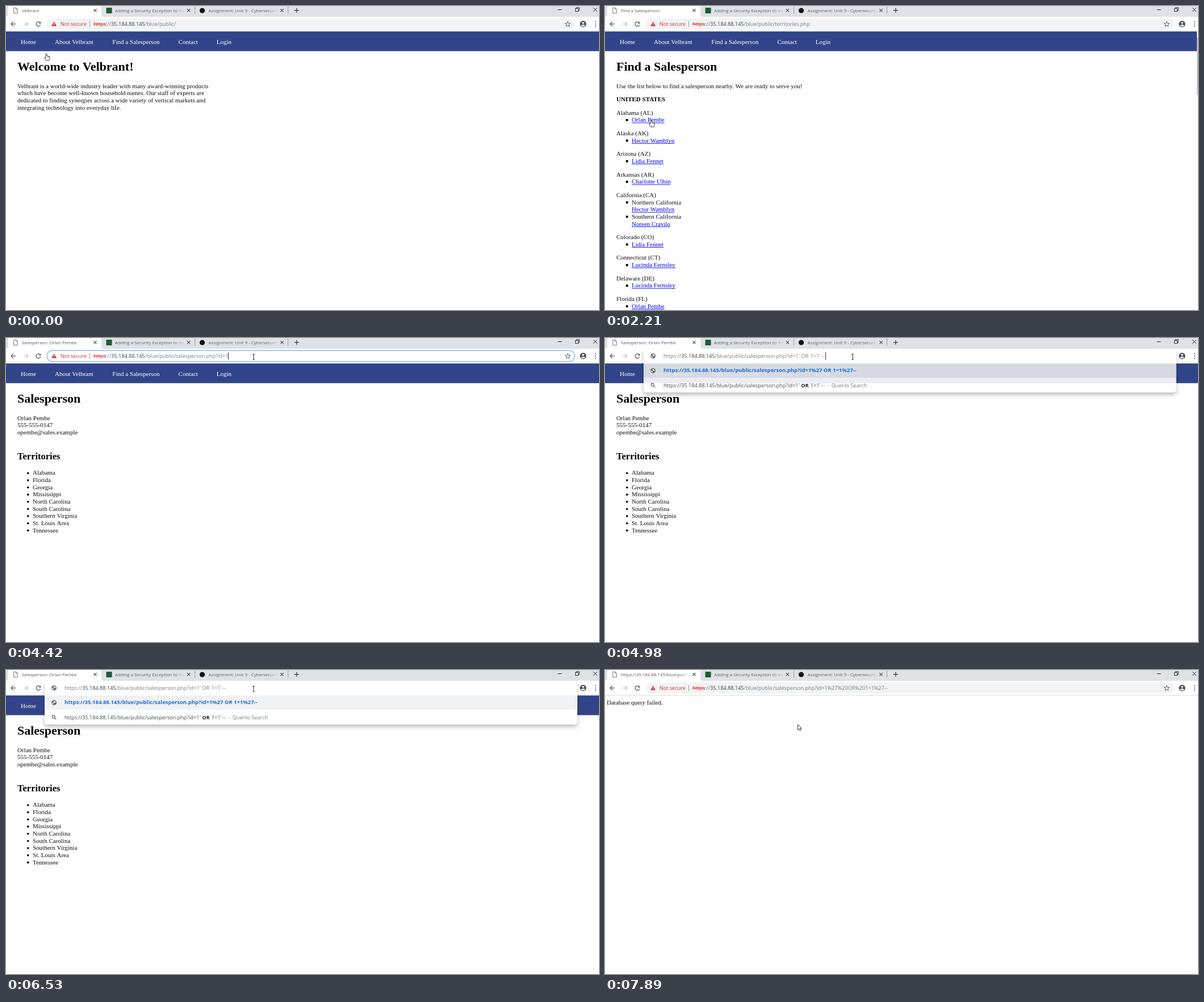
These frames come from a looping animation (1044 px wide and 536 px high, 8 s). An HTML page with a canvas:

```html
<!DOCTYPE html>
<html lang="en">
<head>
<meta charset="utf-8">
<title>Browser session</title>
<style>
  html, body { margin: 0; width: 100%; height: 100%; overflow: hidden; background: #fefefe; }
  canvas { display: block; }
</style>
</head>
<body>
<canvas id="stage" width="1044" height="536"></canvas>
<script>
const ctx = document.getElementById("stage").getContext("2d");
const LOOP = 8000, W = 1044, H = 536;
const UI = '"Open Sans", "Noto Sans", sans-serif';
const SERIF = '"Liberation Serif", "Times New Roman", serif';
const LINE = 12.65;
const INK = "#111", GREY = "#777b80", DARK = "#3c4043", RED = "#d93025", BLUE = "#1a6fe0";

const COMPANY = "Velbrant", SELLER = "Orlan Pembe";
const HOST = "35.184.88.145", BASE = "/blue/public/";
const PERSON = BASE + "salesperson.php?id=1";

// Pointer holds each place until the next time: [ms, x, y, kind]
const POINTER = [
  [0, 71, 83.5, "hand"], [280, 162, 75.5, "arrow"], [430, 205, 70, "hand"],
  [560, 244, 66, "hand"], [710, 270, 60, "hand"], [830, 294, 58, "arrow"],
  [950, 234, 56, "hand"], [1410, 243, 110, "arrow"], [1560, 170, 130, "arrow"],
  [1680, 114, 151, "arrow"], [1830, 100, 170, "arrow"], [1950, 88, 190, "arrow"],
  [2070, 81, 200, "arrow"], [2210, 81, 200.5, "hand"], [2740, 336, 156, "arrow"],
  [2890, 390, 110, "arrow"], [3010, 424, 70, "arrow"], [3130, 440, 45, "arrow"],
  [3250, 436, 33, "beam"], [7890, 339.5, 96.2, "arrow"]
];

const STATES = [
  ["Alabama (AL)", [SELLER]],
  ["Alaska (AK)", ["Hector Wamblyn"]],
  ["Arizona (AZ)", ["Lidia Fennet"]],
  ["Arkansas (AR)", ["Charlotte Ulbin"]],
  ["California (CA)", ["Hector Wamblyn", "Noreen Cravilo"], ["Northern California", "Southern California"]],
  ["Colorado (CO)", ["Lidia Fennet"]],
  ["Connecticut (CT)", ["Lucinda Fernsley"]],
  ["Delaware (DE)", ["Lucinda Fernsley"]],
  ["Florida (FL)", [SELLER]]
];
const AREAS = ["Alabama", "Florida", "Georgia", "Mississippi", "North Carolina", "South Carolina",
  "Southern Virginia", "St. Louis Area", "Tennessee"];

const within = (t, a, b) => t >= a && t < b;

function rect(x, y, w, h, color) {
  ctx.fillStyle = color;
  ctx.fillRect(x, y, w, h);
}

function shape(draw, fill, stroke, width = 1) {
  ctx.beginPath();
  draw();
  if (fill) { ctx.fillStyle = fill; ctx.fill(); }
  if (stroke) { ctx.strokeStyle = stroke; ctx.lineWidth = width; ctx.stroke(); }
}

const disc = (x, y, r, fill, stroke, width) =>
  shape(() => ctx.arc(x, y, r, 0, Math.PI * 2), fill, stroke, width);

function poly(points, fill, stroke, width, open) {
  shape(() => {
    points.forEach(([x, y]) => ctx.lineTo(x, y));
    if (!open) ctx.closePath();
  }, fill, stroke, width);
}

const line = (x1, y1, x2, y2, color, width = 1) =>
  poly([[x1, y1], [x2, y2]], null, color, width, true);

function cross(x, y, r, color, width) {
  line(x - r, y - r, x + r, y + r, color, width);
  line(x - r, y + r, x + r, y - r, color, width);
}

// Draws text and returns its right end
function write(text, x, y, size, color, family, weight = "400") {
  ctx.font = `${weight} ${size}px ${family}`;
  ctx.fillStyle = color;
  ctx.fillText(text, x, y);
  return x + ctx.measureText(text).width;
}

const ui = (text, x, y, color = GREY) => write(text, x, y, 9.13, color, UI);
const body = (text, x, y, color = INK) => write(text, x, y, 11, color, SERIF);
const head = (text, x, y, size) => write(text, x, y, size, "#000", SERIF, "700");

function link(text, x, y) {
  const end = body(text, x, y, "#0000ee");
  rect(x, y + 1.2, end - x, 0.9, "#0000ee");
}

function tabTitle(text, x, end, color) {
  const fade = ctx.createLinearGradient(end - 17, 0, end, 0);
  fade.addColorStop(0, color);
  fade.addColorStop(1, "rgba(95,99,104,0)");
  write(text, x, 10.6, 7.83, fade, UI);
}

function globe(x, y) {
  disc(x, y, 4.4, "#5f6368");
  poly([[x - 3.5, y - 0.6], [x - 0.8, y + 1], [x - 0.6, y + 3.4], [x - 2.6, y + 2.4]], "#fff");
  poly([[x - 0.8, y - 2.9], [x + 2, y - 2.6], [x + 3, y + 0.6], [x + 1.4, y + 0.3], [x - 1, y - 0.9]], "#fff");
}

function tabs(title, loading, t) {
  rect(0, 0, W, 19, "#dee1e6");
  shape(() => {
    ctx.moveTo(0, 19);
    ctx.quadraticCurveTo(4, 19, 4, 14);
    ctx.lineTo(4, 0);
    ctx.lineTo(168, 0);
    ctx.lineTo(168, 14);
    ctx.quadraticCurveTo(168, 19, 172, 19);
  }, "#fff");
  if (loading) {
    const a = t / 160;
    shape(() => ctx.arc(17, 8, 3.8, a, a + 4.4), null, "#8a8e94", 1.3);
  } else {
    poly([[13.8, 3.2], [17.8, 3.2], [20.3, 5.7], [20.3, 12.6], [13.8, 12.6]], "#fff", "#62666b", 0.9);
    poly([[17.6, 3.2], [17.6, 6], [20.3, 6]], null, "#62666b", 0.8, true);
  }
  tabTitle(title, 28, 149, "#55595e");
  rect(176.5, 3, 10, 10, "#1f5b33");
  tabTitle("Adding a Security Exception to Your", 192, 315, "#5f6368");
  disc(345.5, 8, 4.6, "#111");
  tabTitle("Assignment: Unit 9 - Cybersecurity", 356.5, 479, "#5f6368");
  [157, 321.5, 486].forEach(x => cross(x, 7.8, 2.6, "#4d5156", 1.2));
  [332.5, 496.5].forEach(x => line(x, 1, x, 14, "#92969b", 0.9));
  line(507.7, 7.7, 515.7, 7.7, "#44484c", 1.4);
  line(511.7, 3.7, 511.7, 11.7, "#44484c", 1.4);
  line(971.5, 6.5, 978.5, 6.5, "#222");
  ctx.strokeStyle = "#222";
  ctx.lineWidth = 0.9;
  ctx.strokeRect(1002.5, 4.5, 5, 5);
  poly([[1004, 4], [1004, 2.7], [1009.3, 2.7], [1009.3, 8], [1008, 8]], null, "#222", 0.9, true);
  cross(1037.5, 6.5, 3.3, "#222", 1);
}

function arrowIcon(x, dir, color) {
  line(x - 4, 31.7, x + 4, 31.7, color, 1.2);
  poly([[x, 27.7], [x + 4 * dir, 31.7], [x, 35.7]], null, color, 1.2, true);
}

function toolbar(loading) {
  rect(0, 19, W, 26, "#fff");
  rect(0, 44, W, 1, "#dcdee1");
  arrowIcon(13, -1, "#4d5156");
  arrowIcon(35, 1, "#bdc0c4");
  if (loading) cross(57, 31.7, 3.4, "#4d5156", 1.3);
  else {
    shape(() => ctx.arc(57, 31.8, 3.9, 0.35, 5.45), null, "#4d5156", 1.3);
    poly([[61.3, 27.4], [61.3, 31.1], [57.6, 31.1]], "#4d5156");
  }
  disc(1016, 31.7, 5.6, "#4d5156");
  disc(1016, 29.8, 1.8, "#fff");
  shape(() => ctx.ellipse(1016, 34.4, 3.2, 1.7, 0, 0, Math.PI * 2), "#fff");
  [27.8, 31.7, 35.6].forEach(y => disc(1038, y, 1, "#4d5156"));
}

function addressBar(path, focused, selected, caret) {
  shape(() => ctx.roundRect(72, 22, 929.5, 19.5, 9.75),
    focused ? "#fff" : "#f1f3f4", focused && "#8fb6f3", 1.4);
  poly([[84.6, 27.6], [89, 35.6], [80.2, 35.6]], RED);
  rect(84.1, 30.2, 1, 2.7, "#fff");
  rect(84.1, 33.7, 1, 1, "#fff");
  ui("Not secure", 95.7, 35, RED);
  rect(147, 26.5, 1, 10.5, "#9a9da2");

  const tone = c => selected ? "#fff" : c;
  if (selected) rect(154, 24, 238, 15, "#0078d7");
  const schemeEnd = ui("https", 154, 35, tone(RED));
  rect(154, 31.6, schemeEnd - 154, 0.9, tone(RED));
  let end = ui("://", schemeEnd, 35, tone(GREY));
  end = ui(HOST, end, 35, tone(DARK));
  end = ui(path, end, 35, tone(GREY));
  if (caret) rect(391, 25, 1, 13, "#333");

  const star = [];
  for (let i = 0; i < 10; i++) {
    const a = i * Math.PI / 5 - Math.PI / 2, r = i % 2 ? 2.1 : 5;
    star.push([989 + r * Math.cos(a), 32.2 + r * Math.sin(a)]);
  }
  poly(star, null, "#5f6368", 1);
}

function typedUrl(y, boldOr, color, hostColor) {
  let x = ui("https://", 103, y, color);
  x = ui(HOST, x, y, hostColor);
  ui(PERSON + "'", x, y, color);
  write("OR", 345.3, y, 9.2, boldOr ? "#222" : color, UI, boldOr ? "700" : "400");
  ui("1=1'", 361.7, y, color);
  ui("--", 381, y, color);
}

function suggestions(opening, caret) {
  const panel = () => ctx.roundRect(68, 20, 937.7, 76, [0, 0, 5, 5]);
  // Shadow only outside the panel so a translucent panel stays clean
  ctx.save();
  ctx.beginPath();
  ctx.rect(0, 21, W, H);
  panel();
  ctx.clip("evenodd");
  ctx.shadowColor = "rgba(0,0,0,.26)";
  ctx.shadowBlur = 7;
  ctx.shadowOffsetY = 4;
  shape(panel, "#fff");
  ctx.restore();

  shape(panel, opening ? "rgba(255,255,255,.9)" : "#fff");
  rect(68, 20, 937.7, 25, "#fff");
  rect(68, 45, 937.7, 25, opening ? "rgba(0,12,40,.09)" : "#eff1f3");
  globe(84.5, 31.7);
  typedUrl(35, false, GREY, DARK);
  if (caret) rect(388, 25, 1, 13, "#333");

  globe(84.5, 57.6);
  write("https://" + HOST + PERSON + "%27 OR 1=1%27--", 103, 60.4, 9.46, BLUE, UI, "700");
  disc(83.6, 82.4, 2.5, null, "#5f6368", 1.1);
  line(85.4, 84.2, 88.3, 87.1, "#5f6368", 1.3);
  typedUrl(86.8, true, "#45494d", "#45494d");
  ui("-", 392, 86.8);
  ui("Quenlo Search", 398.7, 86.8);
}

function nav(width) {
  rect(0, 45, width, 34.6, "#33458a");
  [["Home", 26], ["About " + COMPANY, 86], ["Find a Salesperson", 187.3], ["Contact", 303.6], ["Login", 370.8]]
    .forEach(([label, x]) => body(label, x, 66.6, "#fff"));
}

const pages = {
  home() {
    nav(W);
    head(`Welcome to ${COMPANY}!`, 20, 114.4, 22);
    [COMPANY + " is a world-wide industry leader with many award-winning products",
      "which have become well-known household names. Our staff of experts are",
      "dedicated to finding synergies across a wide variety of vertical markets and",
      "integrating technology into everyday life."
    ].forEach((s, i) => body(s, 20, 144.6 + i * LINE));
  },
  list() {
    nav(1042);
    rect(1042, 45, 2, H, "#f1f1f1");
    rect(1042, 56, 2, 100, "#c1c1c1");
    head("Find a Salesperson", 20, 114.4, 22);
    body("Use the list below to find a salesperson nearby. We are ready to serve you!", 20, 144.6);
    head("UNITED STATES", 20, 168.1, 11);
    let y = 191.7;
    for (const [state, people, regions] of STATES) {
      body(state, 20, y);
      people.forEach((name, i) => {
        y += LINE;
        rect(36.8, y - 5.2, 3.8, 3.8, "#000");
        if (regions) {
          body(regions[i], 47, y);
          y += LINE;
        }
        link(name, 47, y);
      });
      y += LINE + 11;
    }
  },
  person() {
    nav(W);
    head("Salesperson", 20, 114.4, 22);
    [SELLER, "555-555-0147", "opembe@sales.example"].forEach((s, i) => body(s, 20, 144.6 + i * LINE));
    head("Territories", 20, 213.8, 16.5);
    AREAS.forEach((s, i) => {
      const y = 241.4 + i * LINE;
      disc(38.7, y - 3.2, 1.8, "#000");
      body(s, 47, y);
    });
  },
  failed() {
    body("Database query failed.", 3, 60.6);
  }
};

const VIEWS = {
  home: [COMPANY, BASE],
  list: ["Find a Salesperson", BASE + "territories.php"],
  person: ["Salesperson: " + SELLER, PERSON],
  failed: ["https://" + HOST + "/blue/public/", PERSON + "%27%20OR%201=1%27--"]
};

const cursors = {
  arrow() {
    poly([[0, 0], [0, 9.6], [2.2, 7.6], [3.7, 10.7], [5.2, 10], [3.8, 7], [6.9, 7]], "#fff", "#222", 0.9);
  },
  hand() {
    shape(() => {
      ctx.moveTo(-1, 7.4);
      ctx.lineTo(-1, 1.2);
      ctx.quadraticCurveTo(0, -0.4, 1.1, 1.2);
      ctx.lineTo(1.1, 4.4);
      ctx.lineTo(4.8, 5.1);
      ctx.quadraticCurveTo(6.2, 5.4, 6.1, 7);
      ctx.quadraticCurveTo(6, 10, 4.8, 12.6);
      ctx.lineTo(-0.3, 12.6);
      ctx.lineTo(-3.1, 8.2);
      ctx.quadraticCurveTo(-3.2, 6.4, -1, 7.4);
    }, "#fff", "#222", 0.9);
    [2.7, 4.4].forEach(x => line(x, 5.2, x, 7.2, "#444", 0.7));
  },
  beam() {
    line(0, -4, 0, 4.5, "#222", 1);
    line(-2, -4.5, 2, -4.5, "#222", 0.9);
    line(-2, 5, 2, 5, "#222", 0.9);
  }
};

function pointer(t) {
  const [, x, y, kind] = POINTER.filter(p => p[0] <= t).pop();
  ctx.save();
  ctx.translate(x, y);
  cursors[kind]();
  ctx.restore();
}

function render(t) {
  const view = t < 1410 ? "home" : t < 2740 ? "list" : t < 7210 ? "person" : "failed";
  const loading = within(t, 1260, 1410) || within(t, 2620, 2740) || within(t, 7090, 7330);
  const [title, path] = VIEWS[view];
  rect(0, 0, W, H, "#fefefe");
  pages[view]();
  tabs(title, loading, t);
  toolbar(loading);
  if (within(t, 4980, 7090)) {
    suggestions(t < 5130, t < 5510 || within(t, 6130, 6530));
  } else {
    addressBar(t >= 7090 ? VIEWS.failed[1] : path,
      within(t, 3620, 4980), within(t, 3890, 4420), within(t, 4420, 4980));
  }
  pointer(t);
}

const start = performance.now();
function frame() {
  render((performance.now() - start) % LOOP);
  requestAnimationFrame(frame);
}
frame();
</script>
</body>
</html>
```
